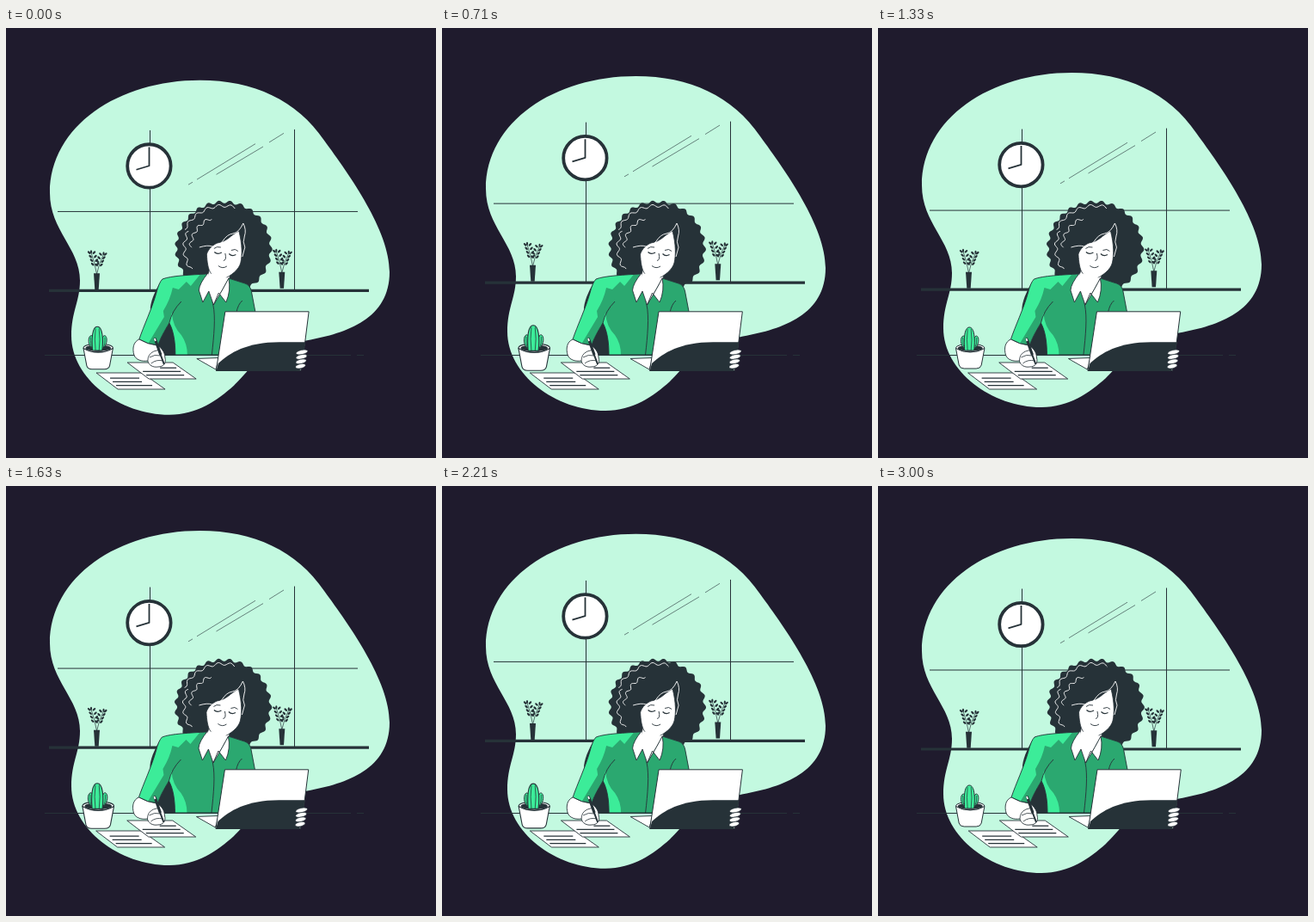
An HTML page with a canvas for the animation above (3.04 s loop, 500 by 500 pixels).

```html
<!DOCTYPE html>
<html lang="en">
<head>
<meta charset="utf-8">
<title>Desk work</title>
<style>
html, body { margin: 0; width: 100%; height: 100%; overflow: hidden; background: #1f1b2d; }
canvas { display: block; width: 500px; height: 500px; }
</style>
</head>
<body>
<canvas id="stage" width="500" height="500"></canvas>
<script>
const ctx = document.getElementById('stage').getContext('2d');
const LOOP = 3040, FRAMES = 73, HALF = LOOP / 2, TAU = Math.PI * 2;
const BG = '#1f1b2d', MINT = '#c3f9e0', INK = '#263238', WHITE = '#fff';
const GREEN = '#2ba870', BRIGHT = '#3cec99';

// Linear there-and-back, 0 to 1 to 0
const swing = (t, period) => 1 - Math.abs(1 - 2 * (t % period) / period);

// Triangular bump that peaks at mid
const bump = (p, mid, rise, fall) => Math.max(0, 1 - (p < mid ? (mid - p) / rise : (p - mid) / fall));

// Two quick swells per period
function beat(t) {
  const p = (t % HALF) / HALF;
  return 1 + .1 * (bump(p, .1, .1, .2) + bump(p, .5, .1, .1));
}

function paint(path, fill, stroke, width = 1) {
  if (fill) { ctx.fillStyle = fill; ctx.fill(path); }
  if (stroke) { ctx.strokeStyle = stroke; ctx.lineWidth = width; ctx.stroke(path); }
}

const shape = (d, fill, stroke, width) => paint(new Path2D(d), fill, stroke, width);

function line(x1, y1, x2, y2, width = 1, color = INK) {
  shape(`M${x1} ${y1}L${x2} ${y2}`, null, color, width);
}

function oval(x, y, rx, ry, fill, stroke, width, turn = 0) {
  const p = new Path2D();
  p.ellipse(x, y, rx, ry, turn, 0, TAU);
  paint(p, fill, stroke, width);
}

function blob() {
  shape('M225.5 61C288 61 338 84 370 131C400 172 446 236 446 284C446 338 397 355 350 363.5'
    + 'C290 376 285 398 265 416C246 433 222 450 190 450C132 450 76 408 76 358'
    + 'C76 330 86 318 86 294C86 256 51 236 51 192C51 114 131 61 225.5 61Z', MINT);
}

// Wavy arc around the head; size 1 is the outer edge of the hair
function curl(size, from, to, waves, height) {
  const p = new Path2D();
  for (let deg = from; deg <= to; deg += 1.5) {
    const a = deg * Math.PI / 180;
    const r = size * (54 + 3 * Math.cos(a - .8)) + height * Math.sin(a * waves);
    p.lineTo(251 + 1.02 * r * Math.cos(a), 254 + r * Math.sin(a));
  }
  return p;
}

function plant(x, y) {
  ctx.save();
  ctx.translate(x, y);
  shape('M-3.5 -19H3.5L2.2 0H-2.2Z', INK);
  for (const [tipX, tipY] of [[-6.5, -43], [8, -41]]) {
    shape(`M0 -18Q${tipX * .3} -30 ${tipX} ${tipY}`, null, INK, .7);
    for (let k = .4; k < 1; k += .18) {
      const px = tipX * k * (k * .4 + .6), py = -18 + (tipY + 18) * k;
      for (const side of [-1, 1]) oval(px + side * 2.9, py - 1.5, 2.2, 1.15, INK, null, 0, -.75 * side);
    }
    oval(tipX, tipY - 1, 1.1, 2, INK);
  }
  ctx.restore();
}

function room() {
  line(167.5, 119.5, 167.5, 305);
  line(335.5, 118.5, 335.5, 305);
  line(60, 214, 409, 214);
  line(50, 306, 422, 306, 3.2);
  line(222, 176.7, 290, 135.2, .6);
  line(244.5, 170.9, 299, 138.5, .6);
  line(306, 133.5, 323, 122.9, .6);
  line(212, 182.7, 217, 179.8, .6);
  oval(166.4, 161, 25.2, 25.2, WHITE, INK, 3.8);
  shape('M166.5 139V160.8L151.5 165.3', null, INK, 1.8);
  plant(105.5, 304.7);
  plant(320.8, 303.2);
}

function head() {
  paint(curl(1, 0, 360, 26, 1.7), INK);
  shape('M237 278L234 292L241 312L250 303L260 292L261 280Z', WHITE, INK, .8);
  shape('M271 236C261 241 258 248 246 250C241 252 236 256 233.5 263C234 272 235 281 239 286'
    + 'C243 291 249 294 253 292C262 288 271 281 273 273C275 264 275 252 271 236Z', WHITE, INK, .8);
  paint(curl(.91, 205, 290, 22, 1.6), null, WHITE, .9);
  paint(curl(.82, 142, 206, 22, 1.8), null, WHITE, .9);
  paint(curl(.68, 178, 250, 20, 1.8), null, WHITE, .9);
  shape('M225 255Q235 252 240 254T252 248Q257 240 264 239T276 227Q280 235 277.5 242T278 255L275 266',
    null, WHITE, .9);
  shape('M242.5 260.5Q246 264 251 261M259.5 262.5Q263 266 267.5 263.5', null, INK, 1.3);
  shape('M242 256.5Q245 253.5 250 255M262 258.5Q267 256 270 259.5'
    + 'M255 262Q257 270 253 270.5M247 276.5Q252 280.5 257 277', null, INK, .9);
}

function body() {
  shape('M182 293C176 300 169 315 168 325L172 380H199V335Z', INK);
  const shirt = new Path2D('M241 322L234 286C216 287 192 288 182 292Q178 296 175 308C170 326 160 347 155 362'
    + 'Q165 368 177 369C179 362 184 353 190 343C195 352 197 365 197 380H290L291 335L285.5 306'
    + 'Q284 299 278 297L259 291Z');
  paint(shirt, BRIGHT);
  // Shaded side
  ctx.save();
  ctx.clip(shirt);
  shape('M228 284L215 300L210 295L201 304L194 302Q191 316 183 329L184 336L166 366L177 370L190 343L193 331'
    + 'Q194 347 204 357Q211 367 211 380H292V284Z', GREEN);
  ctx.restore();
  paint(shirt, null, INK, .9);
  shape('M190 343Q193 329 204 318M241 322C244 336 242 358 239.5 380M268 331Q270 321 275 317', null, INK, .9);
  shape('M236 285L259 291L241.5 322L234 300Z', WHITE);
  shape('M235 285Q225 297 224.5 305L229 319L236 306L241.5 322', WHITE, INK, .9);
  shape('M259 291Q254 301 241.5 322L247.5 308L256 319Q262 305 259 291Z', WHITE, INK, .9);
}

function sheet(x, y, rows) {
  shape(`M${x} ${y}h53l27 19h-55Z`, WHITE, INK, .9);
  rows.forEach(([from, to], i) => {
    const rowY = y + 6.2 + i * 4.2;
    line(x + from, rowY, x + to, rowY, 1.3);
  });
}

function papers() {
  sheet(105.2, 401, [[16, 50], [19, 53], [23, 65]]);
  sheet(141.3, 389, [[38, 57], [18, 62], [22, 66]]);
}

function hand() {
  shape('M155 362C148 365 147 373 149 380C151 386 158 388 165 387C166 392 171 395 177 394'
    + 'C183 394 187 390 185 383C185 377 181 372 176 369Q165 368 155 362Z', WHITE, INK, .9);
  shape('M165 387Q165 379 172 376L179 374M167 383Q173 379 180 381M169 390Q175 385 183 387', null, INK, .8);
  line(173, 360.5, 175, 365, 3);
  line(173, 361, 174, 364, 1.8, WHITE);
  line(174.5, 364.5, 180, 380, 3.2);
  line(179.5, 379, 184, 391, 2);
}

function laptop() {
  shape('M222 384.5L248 383.5L244 397Z', WHITE, INK, .9);
  shape('M255 329.8H352.3L347 372L343 398.5H244.5Z', WHITE, INK, 1);
  shape('M247 390C260 378 280 365.3 318 365.3H348L344 393Q343 399 339 399H244.5Z', INK);
  for (let i = 0; i < 4; i++)
    oval(344.2 - i * .5, 377 + i * 5.4, 7 - i * .35, 2.6, WHITE, INK, .7, -.22);
}

function pot() {
  oval(0, 0, 16.7, 4.7, WHITE, INK, 1);
  oval(0, .2, 14.5, 3.6, INK);
  shape('M-6 1C-12 -2 -12 -13 -8 -14Q-5 -14 -5 -6M4 1C11 -2 11 -14 7 -14Q4 -13 4 -5', BRIGHT, INK, .9);
  shape('M-6.5 3C-7.5 -10 -7 -24 -1 -24C5 -24 6 -10 4.5 3Z', BRIGHT, INK, 1);
  shape('M-3 -22Q-4.5 -10 -3 3M1 -22Q2.5 -10 1 3M-8.5 -12Q-9 -4 -7 0M7.5 -12Q8 -4 5.5 0', null, INK, .7);
  shape('M-16.7 .5Q-9 5 0 5T16.7 .5L13 20Q12 24 7 24H-7Q-12 24 -13 20Z', WHITE, INK, 1);
}

function place(x, y, scale, ...parts) {
  ctx.save();
  ctx.translate(x, y);
  ctx.scale(scale, scale);
  parts.forEach(draw => draw());
  ctx.restore();
}

function render(t) {
  const near = swing(t, HALF), far = swing(t, LOOP), slide = -3 * near;
  ctx.fillStyle = BG;
  ctx.fillRect(0, 0, 500, 500);
  place(0, -10 * far, 1, blob);
  place(0, -10 * near, 1, room);
  place(slide, 0, 1, head, body);
  line(45, 380.5, 401, 380.5);
  line(408, 380.5, 416, 380.5);
  place(slide, 0, 1, papers, hand, laptop);
  place(107.2, 372, beat(t), pot);
}

ctx.lineJoin = 'round';
const step = LOOP / FRAMES;

function tick() {
  // Steps fall on the nearest 10 ms
  const frame = Math.floor((performance.now() % LOOP + 5) / step);
  render((frame + 1) * step);
  requestAnimationFrame(tick);
}
tick();
</script>
</body>
</html>
```
